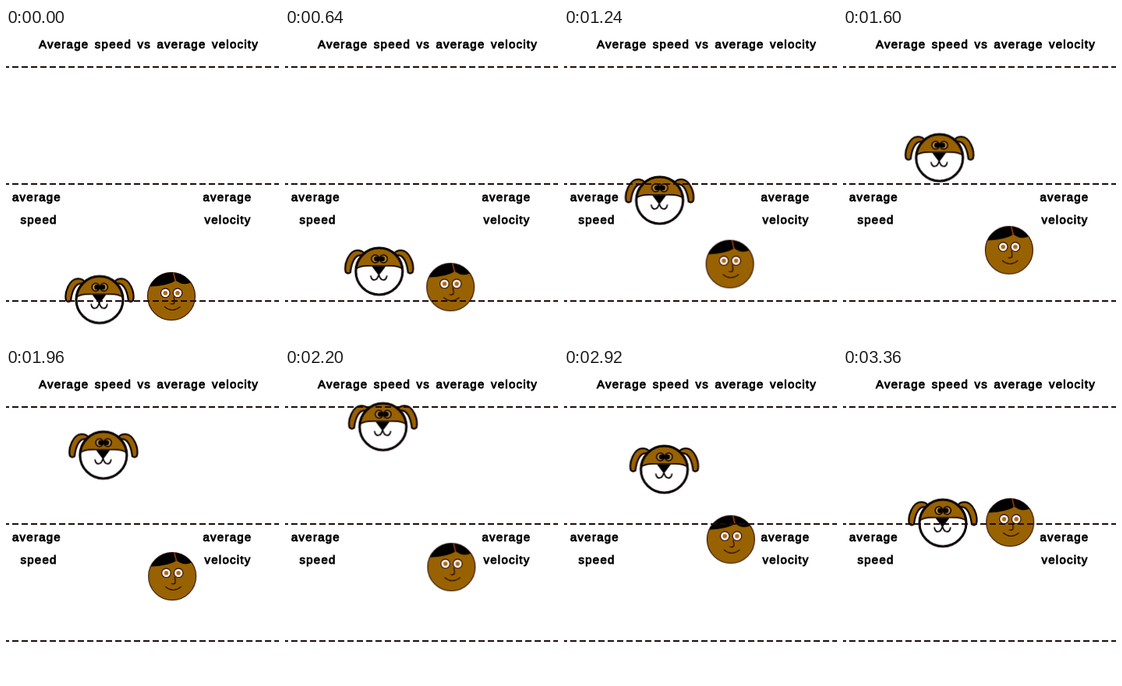
An HTML page that plays this animation: 350 by 400 pixels, repeating every 3.84 s.

```html
<!DOCTYPE html>
<html lang="en">
<head>
<meta charset="utf-8">
<title>Average speed vs average velocity</title>
<style>
  html, body { margin: 0; width: 100%; height: 100%; overflow: hidden; background: #fff; }
  svg { display: block; width: 350px; height: 400px; }

  .title, .label {
    font: 15px "Liberation Sans", Arial, sans-serif;
    letter-spacing: 1.25px;
    word-spacing: 2.1px;
    stroke: #000;
    stroke-width: .9px;
  }
  .grid { stroke: #1e0a0a; stroke-width: 1.8; stroke-dasharray: 8 4; stroke-dashoffset: 4; }
  .fur, .skin { fill: #996200; }
  .ink { stroke: #0a0000; stroke-width: 3.1; }
  .thin { stroke: #240600; stroke-width: 1.2; }
  .line { fill: none; stroke-linecap: round; }

  .dog { animation: there-and-back 3840ms infinite; }
  .person { animation: straight-up 3840ms infinite; }

  /* Both move in 40 ms steps; the dog turns round at the top line. */
  @keyframes there-and-back {
    0% { transform: translate(120px, 348.3px); animation-timing-function: step-end; }
    10.416% { transform: translate(120px, 348.3px); animation-timing-function: steps(49, end); }
    61.458% { transform: translate(126.1px, 51px); animation-timing-function: step-end; }
    62.499% { transform: translate(129.2px, 48.6px); animation-timing-function: steps(24, end); }
    87.499%, 100% { transform: translate(128px, 198.7px); animation-timing-function: step-end; }
  }
  @keyframes straight-up {
    0% { transform: translate(212px, 344px); animation-timing-function: step-end; }
    10.416% { transform: translate(212px, 344px); animation-timing-function: steps(74, end); }
    87.499%, 100% { transform: translate(214.2px, 198px); animation-timing-function: step-end; }
  }
</style>
</head>
<body>
<svg viewBox="0 0 350 400">
  <defs>
    <path id="ear" class="fur" stroke="#0a0000" stroke-width="2.200" stroke-linejoin="round"
      d="M-43 1C-45.500-9-39-26.500-28-27C-24-27-21-25.500-19-23L-22.500-20.500C-31-22-35.500-11-37 1.500Q-40 4-43 1Z"/>
    <g id="dog-eye">
      <circle r="4.900" fill="#b98a3c" stroke="#0a0000" stroke-width="1.500"/>
      <circle cx="1.500" r="3.200"/>
    </g>
    <g id="eye">
      <circle class="thin" r="5.800" fill="#fff"/>
      <circle r="2.800" fill="#b0681a"/>
    </g>
  </defs>

  <g class="dog">
    <use href="#ear"/>
    <use href="#ear" transform="scale(-1 1)"/>
    <circle r="30" fill="#fff"/>
    <path class="fur" d="M-29.800-3A30 30 0 0 1 29.800-3Q24-8 9-7H-9Q-24-8-29.800-3Z"/>
    <path class="line" stroke="#0a0000" stroke-width="1.600" d="M-29.800-3Q-24-8-9-7H9Q24-8 29.800-3"/>
    <circle class="ink" r="30" fill="none"/>
    <use href="#dog-eye" transform="translate(-5 -16)"/>
    <use href="#dog-eye" transform="translate(5.500 -16) scale(-1 1)"/>
    <path d="M-9.500-6.500H8.500L1 3.500Q-.5 5-2 3.500Z"/>
    <path class="line" stroke="#0a0000" stroke-width="1.700" d="M-10.800 6C-9.500 13-2.500 13-.5 4C1.500 13 8.500 13 9.800 6"/>
  </g>

  <g class="person">
    <circle class="skin" r="30.500" stroke="#2e0a00" stroke-width="1.100"/>
    <path d="M-27-14A30.500 30.500 0 0 1 2-30.500L4.500-19.500Q-5-13.500-27-12.500Z"/>
    <path d="M3.500-30.300A30.500 30.500 0 0 1 25-17.500Q15-13 6-20Z"/>
    <path class="line" stroke="#a02818" stroke-width="1" d="M2.500-30.500L5.500-20"/>
    <use href="#eye" x="-7.700" y="-4.300"/>
    <use href="#eye" x="8" y="-4.300"/>
    <path class="line thin" d="M3 1Q4.500 6 3.800 8.500Q2 10.500-1 9.500"/>
    <path class="line thin" d="M-8.500 13.500Q1 21.500 11 13.500"/>
  </g>

  <g class="grid">
    <path d="M0 50H350M0 200H350M0 350H350"/>
  </g>
  <text class="title" x="42" y="26">Average speed vs average velocity</text>
  <g class="label">
    <text x="8" y="222">average</text>
    <text x="18.500" y="251">speed</text>
    <text x="252.500" y="222">average</text>
    <text x="254.500" y="251">velocity</text>
  </g>
</svg>
</body>
</html>
```
